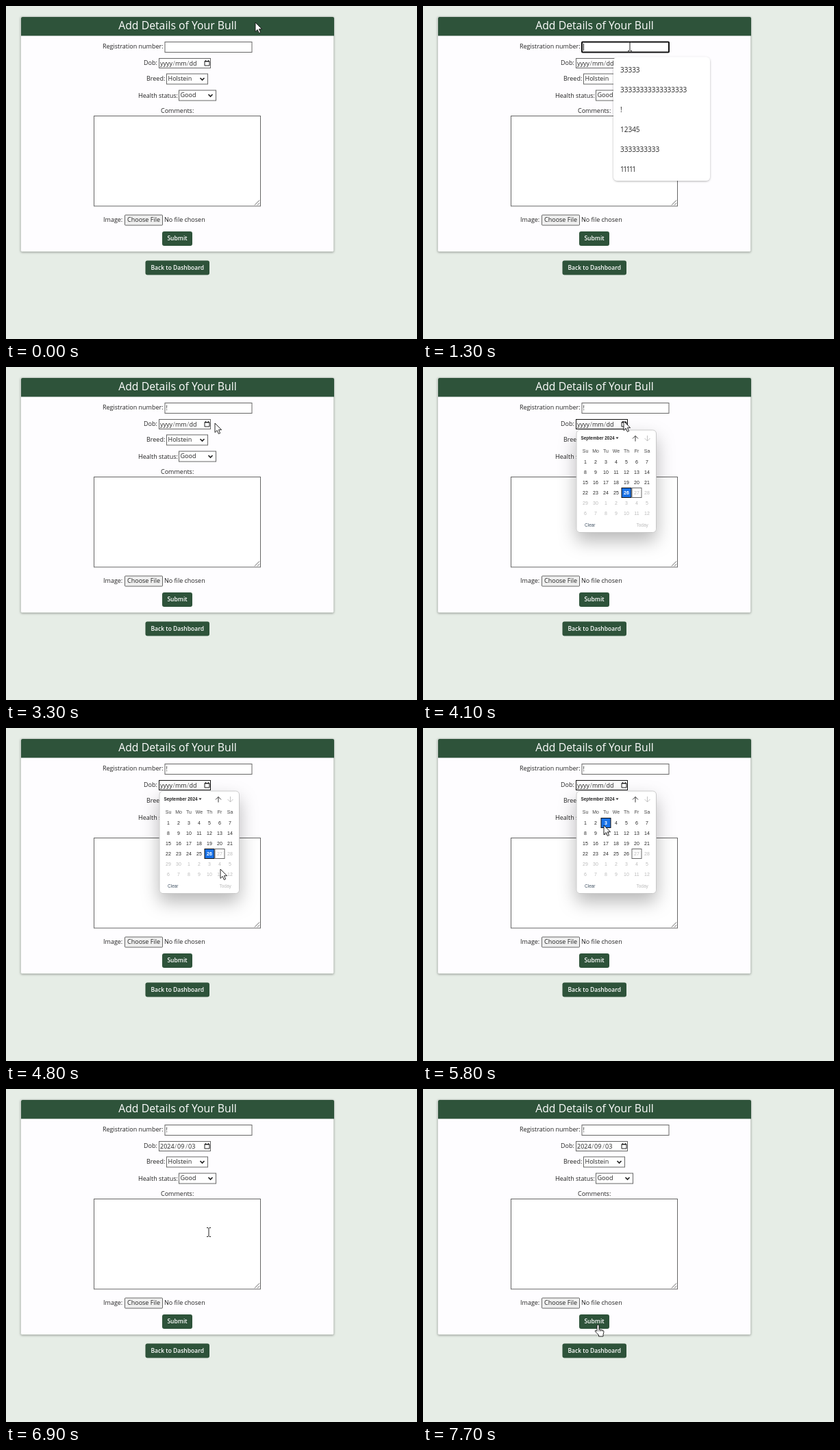
Animation of 600x486 px, one loop 8 s. Source, as an HTML page:

```html
<!DOCTYPE html>
<html lang="en">
<head>
<meta charset="utf-8">
<title>Add details form</title>
<style>
html, body { margin: 0; width: 100%; height: 100%; overflow: hidden; background: #e6ede6; }
svg { display: block; width: 600px; height: 486px; font: 9px "Open Sans", "Noto Sans", sans-serif; fill: #222; }
.box { fill: #fff; stroke: #666; }
.line { fill: none; stroke: #222; }
.btn { font-size: 8.5px; font-weight: 600; fill: #fff; }
.mid { text-anchor: middle; }
.cal { font: 7px "Liberation Sans", Arial, sans-serif; }
.pale { fill: #bbb; }
.bold { font-weight: bold; }
</style>
</head>
<body>
<svg viewBox="0 0 600 486">
  <defs>
    <filter id="soft" x="-20%" y="-20%" width="140%" height="140%"><feDropShadow dx="0" dy="1" stdDeviation="1.5" flood-opacity=".3"/></filter>
    <filter id="deep" x="-50%" y="-50%" width="200%" height="200%"><feDropShadow dx="0" dy="12" stdDeviation="13" flood-opacity=".28"/></filter>
  </defs>
  <rect x="21.5" y="15.5" width="457" height="343" rx="2" fill="#fefdff" stroke="#cbd1cb" filter="url(#soft)"/>
  <path d="M22 43.500V18q0-2 2-2H477q2 0 2 2V43.500Z" fill="#2e533a"/>
  <text x="250.500" y="34" class="mid" font-size="15.800" style="fill:#fff">Add Details of Your Bull</text>
  <g id="form"></g>
  <g id="list" filter="url(#soft)"></g>
  <g id="calendar" class="cal"></g>
  <g id="cursor"></g>
</svg>
<script>
const $ = id => document.getElementById(id);
const text = (x, y, s, attrs = '') => `<text x="${x}" y="${y}" ${attrs}>${s}</text>`;
const rect = (x, y, w, h, attrs = 'class="box"') => `<rect x="${x}" y="${y}" width="${w}" height="${h}" ${attrs}/>`;
const path = (d, attrs = 'class="line"') => `<path d="${d}" ${attrs}/>`;
const button = (x, y, w, s) =>
  rect(x, y, w, 21, 'rx="3" fill="#2e533a"') + text(x + w / 2, y + 13.2, s, 'class="btn mid"');
const select = (x, y, w, s) =>
  rect(x, y, w, 15) + text(x + 2, y + 10.3, s) +
  path(`M${x + w - 11} ${y + 6}l3 3 3-3`, 'class="line" stroke-width="1.700"');

// Time, x and y of the pointer; it moves evenly between the points.
const track = [
  [0, 364, 24], [500, 302, 59], [1900, 302, 59], [2100, 300, 150], [2200, 300, 124],
  [2500, 300, 124], [2900, 421, 76], [3300, 305, 82], [3400, 293, 79], [4100, 293, 79],
  [4800, 313, 206], [5300, 313, 206], [5500, 264, 142], [6100, 264, 142], [6600, 296, 139],
  [6800, 296, 139], [6900, 296, 209], [7100, 296, 209], [7700, 254, 344], [8000, 254, 344]
];

function pointer(t) {
  const i = track.findIndex(p => p[0] > t);
  const [t0, x0, y0] = track[i - 1], [t1, x1, y1] = track[i];
  const k = (t - t0) / (t1 - t0);
  return [x0 + (x1 - x0) * k, y0 + (y1 - y0) * k];
}

function form(t) {
  const focus = t >= 800 && t < 2600, filled = t >= 2200, dated = t >= 5900;
  const caret = focus && (t < 1100 || t >= 1300);
  const date = dated
    ? [[225, '2024'], [246, '/'], [250, '09'], [262, '/'], [266, '03']]
    : [[225, 'yyyy'], [243.5, '/'], [247, 'mm'], [264, '/'], [267.5, 'dd']];
  return text(141, 62, 'Registration number:') +
    rect(232, 52.5, 127, 15, focus ? 'rx="1" fill="#fff" stroke="#111" stroke-width="2"' : undefined) +
    (filled ? text(233.5, 62.5, '!') : '') +
    (caret ? path(filled ? 'M237.500 55v10' : 'M234.500 55v10') : '') +
    text(201, 86, 'Dob:') +
    rect(223.5, 76.5, 75, 14, `fill="#fff" stroke="${t >= 4000 && t < 6000 ? '#111' : '#666'}"`) +
    date.map(([x, s]) => text(x, 86.5, s, s === '/' ? 'fill="#777"' : '')).join('') +
    path('M290 80.500h7v6.500h-7ZM290 81h7M291.500 79v2M295.500 79v2') +
    text(205, 109, 'Breed:') + select(234.5, 99, 60, 'Holstein') +
    text(193, 133.5, 'Health status:') + select(252.5, 123, 54, 'Good') +
    text(226, 156, 'Comments:') +
    rect(128.5, 160.5, 243, 131.5) + path('M363 290.500l7-7M367 290.500l3-3', 'class="line" stroke-width=".7"') +
    text(142, 314.5, 'Image:') +
    rect(173.5, 305, 55, 15, 'rx="1" fill="#efefef" stroke="#666"') +
    text(177, 314.5, 'Choose File') + text(231, 315, 'No file chosen') +
    button(228, 329, 44, 'Submit') + button(203.5, 371.5, 93.5, 'Back to Dashboard');
}

function list(t) {
  if (t < 900 || t >= 2200) return '';
  const items = ['33333', '3'.repeat(17), '!', '12345', '3'.repeat(10), '11111'];
  return rect(278, 74.5, 141, 180.5, 'rx="6" fill="#fff"') +
    (t >= 2100 ? rect(278, 137, 141, 29, 'fill="#eee"') : '') +
    items.map((s, i) => text(288, 96.5 + 29 * i, s,
      `font-size="10" ${s === '11111' ? 'letter-spacing="-1.400"' : ''}`)).join('');
}

function calendar(t) {
  if (t < 4000 || t >= 5900) return '';
  const chosen = t < 5500 ? 26 : 3;
  let out = rect(224, 92, 116.5, 149.5, 'rx="5" fill="#fff" stroke="#bbb" stroke-width=".8" filter="url(#deep)"') +
    text(230.5, 105.5, 'September 2024', 'class="bold" font-size="6.400"') +
    path('M281.500 102.500h4l-2 2.500Z', '') +
    path('M310 108.500v-8m-4 4l4-4 4 4', 'class="line" stroke-width=".9"') +
    path('M327.500 100v8m-4-4l4 4 4-4', 'fill="none" stroke="#bbb" stroke-width=".9"') +
    text(236, 232.5, 'Clear', 'font-size="6.500" style="fill:#456"') +
    text(311.5, 232.5, 'Today', 'class="pale" font-size="6.500"');
  ['Su', 'Mo', 'Tu', 'We', 'Th', 'Fr', 'Sa'].forEach((s, i) =>
    out += text(237 + 15 * i, 125, s, 'class="mid" style="fill:#444"'));
  for (let day = 1; day <= 42; day++) {
    const x = 237 + 15 * ((day - 1) % 7), y = 138.5 + 15 * Math.floor((day - 1) / 7);
    const on = day === chosen;
    if (on) out += rect(x - 7, y - 7, 14, 14, 'fill="#1a73e8" stroke="#111"');
    if (day === 27) out += rect(x - 7, y - 7, 14, 14, 'fill="none" stroke="#666"');
    out += text(x, y + 2.5, day > 30 ? day - 30 : day,
      `class="mid ${on ? 'bold' : day > 26 ? 'pale' : ''}" ${on ? 'style="fill:#fff"' : ''}`);
  }
  return out;
}

function cursor(t) {
  const [x, y] = pointer(t);
  const over = (l, top, r, b) => x > l && x < r && y > top && y < b;
  const popup = t >= 2000 && t < 2200 || t >= 4000 && t < 5900;
  let shape = path('M0 0V13.500L3.200 10.500 5.400 15.500 7.600 14.500 5.500 9.700H9.600Z',
    'fill="#fff" stroke="#111" stroke-width=".9"');
  if (!popup && (over(232, 52, 359, 68) || over(128, 160, 372, 292)))
    shape = path('M-3-6.500h2l1 1 1-1h2M-3 6.500h2l1-1 1 1h2M0-5.500v11');
  else if (over(228, 329, 272, 350))
    shape = path('M0 1q1.500-2 3 0V7l5 1q2 .5 2 2.500l-1 4v2.500H2.500V15L-2.500 10q-.5-2 1-1.500L0 9.500Z',
      'fill="#fff" stroke="#111" stroke-width=".9"') + path('M3 7v3M5.500 7.500v2.500M8 8v2', 'class="line" stroke-width=".7"');
  return `<g transform="translate(${x} ${y})">${shape}</g>`;
}

const parts = { form, list, calendar, cursor };
let shown = -1;
function draw() {
  const t = Math.floor(performance.now() % 8000 / 100) * 100;
  if (t !== shown) for (const id in parts) $(id).innerHTML = parts[id](t);
  shown = t;
  requestAnimationFrame(draw);
}
draw();
</script>
</body>
</html>
```
